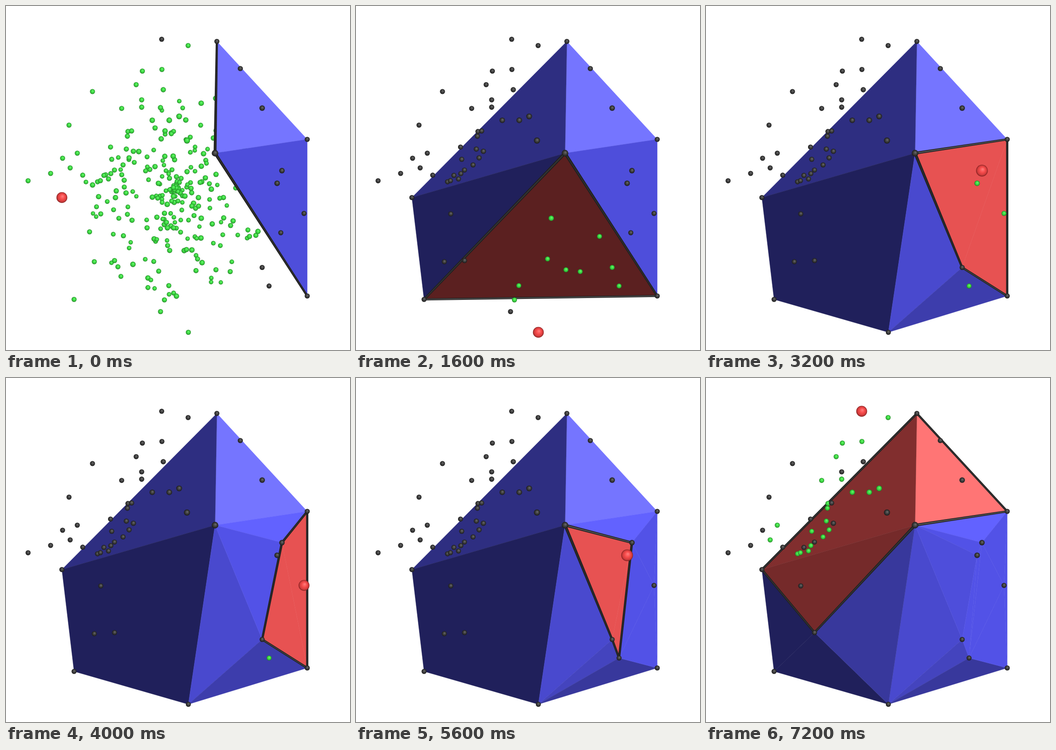
Write an HTML page with a canvas that moves like this. It is 748 px wide and 748 px high and loops after 8000 ms.

```html
<!DOCTYPE html>
<html lang="en">
<head>
<meta charset="utf-8">
<title>Convex hull, step by step</title>
<style>
html, body { margin: 0; width: 100%; height: 100%; overflow: hidden; background: #fff; }
canvas { display: block; width: 748px; height: 748px; }
</style>
</head>
<body>
<canvas id="stage" width="748" height="748"></canvas>
<script>
const ctx = document.getElementById('stage').getContext('2d');
const STEP = 800;

// Life strings hold one letter per step: g outside, k plain, r next apex, . hidden.
const verts = {
  A: [458.5, 77, 'kkkkkkkkkk'],
  B: [655, 290, 'kkkkkkkkkk'],
  C: [454.5, 320, 'kkkkkkkkkk'],
  D: [655, 630.5, 'kkkkkkkkkk'],
  E: [121.5, 416.5, 'rkkkkkkkkk'],
  F: [148, 638, 'grkkkkkkkk'],
  G: [396.5, 709.5, 'ggrkkkkkkk'],
  H: [557, 568.5, 'kggrkkkkkk'],
  I: [600, 358, 'kkkgrkkkkk'],
  J: [648, 451, 'kkkggrkkkk'],
  K: [589.5, 385.5, 'kkkggkkrkk'],
  L: [572, 608.8, 'kgggggrkkk'],
  M: [236, 553.5, 'ggkkkkkkrk'],
  N: [338.5, 72.3, 'kkkkkkkkkr']
};

// Loose points that stay in view, by life.
const loose = {
  gkkkkkkkkg: [[396, 86], [296.5, 141.5], [339, 138], [283, 171], [251.5, 222.7], [295, 220],
    [318, 248.5], [355, 248.5], [376.5, 240], [155, 320], [139.5, 352]],
  gkkkkkkkkk: [[188, 186], [342, 182], [295, 204], [137, 259], [123, 331], [97, 364], [393.5, 292.5]],
  ggkkkkkkgk: [[48, 380], [206, 452]],
  'ggkkkkkkg.': [[192, 556]],
  kkkkkkkkkk: [[509.5, 136], [557, 222]],
  'kkkg......': [[597.5, 493]],
  'ggg.......': [[424.5, 461.5], [416.5, 550], [456.5, 573.5], [487.5, 577.5], [354, 608], [344.5, 639]],
  'gggk......': [[529.5, 501]],
  'ggk.......': [[336, 664.5]]
};

// Face names by brightness; all others take FRONT.
const FRONT = 231;
const shades = {
  330: 'ABC', 276: 'CBI', 219: 'CBD CBDG CKH', 206: 'CGH', 190: 'HGL', 172: 'HGD HDG',
  156: 'LGD CGM', 129: 'ACE', 117: 'ECM', 91: 'CDE CEF CFD CEFG EFM FGM'
};
const shadeOf = {};
for (const level in shades) for (const name of shades[level].split(' ')) shadeOf[name] = +level;

// Blue faces, faces seen by the apex, horizon (closed when it ends where it starts).
const steps = [
  ['ABC CBD', '', 'ACD'],
  ['ABC CBD ACE', 'CDE', 'CDEC'],
  ['ABC CBD ACE CEF', 'CFD', 'CFDC'],
  ['ABC ACE CEFG', 'CBDG', 'CBDGC'],
  ['ABC ACE CEFG CGH HGD', 'CBH BDH', 'CBDHC'],
  ['ABC ACE CEFG CGH HGD CBI CIH', 'IBD IDH', 'IBDHI'],
  ['ABC ACE CEFG CGH CBI CIH BIJ BJD', 'IJDH HDG', 'IJDGHI'],
  ['ABC ACE CEFG CGH CBI BIJ BJD HGL LGD LDJ LJI', 'CIH HIL', 'CILHC'],
  ['ABC ACE CGH CBI BIJ BJD HGL LGD LDJ LJI CIK CKH HKL KIL', 'CEFG', 'CEFGC'],
  ['CGH CBI BIJ BJD HGL LGD LDJ LJI CIK CKH HKL KIL EFM FGM CGM', 'ABC ACE ECM', 'EABCME']
];

const tones = {
  g: ['#70fa74', '#42e048', '#33b838', '#17701a'],
  k: ['#707070', '#444', '#2c2c2c', '#161616'],
  r: ['#ff8080', '#f84c4c', '#d03c3c', '#802020']
};

let seed = 41;
function rand() {
  seed = (seed * 16807) % 2147483647;
  return seed / 2147483647;
}

// Inner points, thinning out from the middle, kept off the upper left side.
function makeCloud(count) {
  const out = [];
  while (out.length < count) {
    const angle = rand() * Math.PI * 2, reach = rand() * 235;
    const x = 367 + Math.cos(angle) * reach * 0.86;
    const y = 398 + Math.sin(angle) * reach;
    if (x + y > 555) out.push([x, y, 4.7 + rand() * 1.3]);
  }
  return out;
}

// Points strewn along the middle of the upper left edge.
function makeBand(count) {
  return Array.from({ length: count }, (_, i) => {
    const along = (i + rand()) / count, off = rand() * 55 - 10;
    const life = i % 3 ? 'gkkkkkkkkg' : 'gkkkkkkkkk';
    return [168 + along * 105 + off * 0.7, 378 - along * 115 + off * 0.7, life];
  });
}

// Balls nearest the front corner look largest.
function sizeAt(x, y) {
  const [cx, cy] = verts.C;
  return Math.max(5.5, 7.2 - Math.hypot(x - cx, y - cy) / 120);
}

function ball(x, y, r, kind) {
  const fill = ctx.createRadialGradient(x + r * 0.15, y - r * 0.25, 0, x, y, r);
  [0, 0.45, 0.8, 1].forEach((at, i) => fill.addColorStop(at, tones[kind][i]));
  ctx.fillStyle = fill;
  ctx.beginPath();
  ctx.arc(x, y, r, 0, 7);
  ctx.fill();
}

function face(name, red) {
  const level = shadeOf[name] || FRONT;
  const main = Math.min(255, level);
  const low = Math.round(level * 0.356);
  ctx.fillStyle = ctx.strokeStyle = red ? `rgb(${main},${low},${low})` : `rgb(${low},${low},${main})`;
  ctx.lineWidth = 0.5;
  ctx.beginPath();
  for (const id of name) ctx.lineTo(verts[id][0], verts[id][1]);
  ctx.closePath();
  ctx.fill();
  ctx.stroke();
}

function strip(a, b, nx, ny, scale, color) {
  ctx.fillStyle = color;
  ctx.beginPath();
  for (const [p, side] of [[a, 1], [b, 1], [b, -1], [a, -1]]) {
    const w = sizeAt(p[0], p[1]) * scale * side;
    ctx.lineTo(p[0] + nx * w, p[1] + ny * w);
  }
  ctx.fill();
}

// Round bar; level ones catch more light.
function bar(a, b) {
  const angle = Math.atan2(b[1] - a[1], b[0] - a[0]);
  const nx = -Math.sin(angle), ny = Math.cos(angle);
  const lit = Math.round(42 + 40 * ny ** 4);
  strip(a, b, nx, ny, 0.43, '#1e1e1e');
  strip(a, b, nx, ny, 0.2, `rgb(${lit},${lit},${lit})`);
}

const cloud = makeCloud(225);
const dots = makeBand(16);
for (const life in loose) for (const [x, y] of loose[life]) dots.push([x, y, life]);
dots.push(...Object.values(verts));

function draw(n) {
  const [blue, red, rim] = steps[n];
  ctx.fillStyle = '#fff';
  ctx.fillRect(0, 0, 748, 748);
  if (n < 2) for (const [x, y, r] of cloud) ball(x, y, r, 'g');
  blue.split(' ').forEach(name => face(name, false));
  if (red) red.split(' ').forEach(name => face(name, true));
  for (let i = 1; i < rim.length; i++) bar(verts[rim[i - 1]], verts[rim[i]]);
  for (const [x, y, life] of dots) {
    const kind = life[n];
    if (kind !== '.') ball(x, y, sizeAt(x, y) * (kind === 'r' ? 2.15 : 1), kind);
  }
}

const start = performance.now();
let shown = -1;
function tick(now) {
  const n = Math.floor(Math.max(0, now - start) / STEP) % steps.length;
  if (n !== shown) draw(shown = n);
  requestAnimationFrame(tick);
}
tick(start);
</script>
</body>
</html>
```
